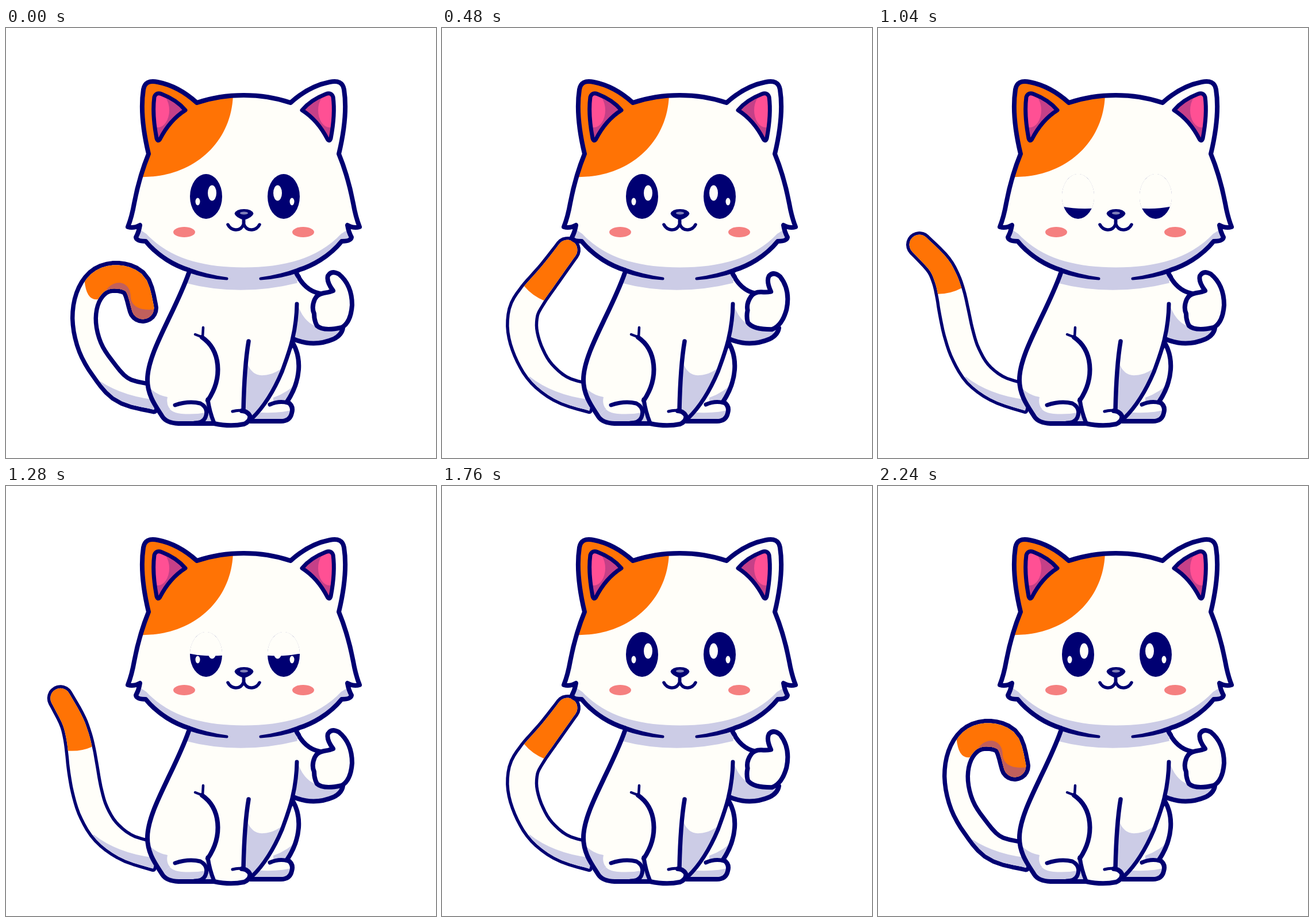
These frames come from a looping animation (748x748 px, 2.32 s). An HTML page:

```html
<!DOCTYPE html>
<html lang="en">
<head>
<meta charset="utf-8">
<title>Cat</title>
<style>
html, body { margin: 0; width: 100%; height: 100%; overflow: hidden; background: #fff; }
svg { display: block; width: 100vw; height: 100vh; }
.line { fill: none; stroke: #000072; stroke-width: 8; stroke-linecap: round; stroke-linejoin: round; }
.ink { fill: #000072; }
.fur { fill: #fffef9; }
.shade { fill: #cccce6; }
.orange { fill: #ff7305; }
</style>
</head>
<body>
<svg viewBox="0 0 748 748">
<defs>
  <path id="half" d="M416 117H413.500Q370 117 332 130Q300 101 264 94Q242 89 239 107Q232 152 248 219Q232 258 223 305Q219 328 212 346Q222 349 233 343Q231 355 226 364Q227 371 243 371C265 398 295 414 318 421Q350 432 385 436H416Z"/>
  <path id="bodyShape" d="M318 426C294 495 246 564 246 612C246 640 262 660 272 676Q279 687 300 688L362 688Q390 694 420 688L428 680C455 655 470 625 499 548L506 479L507 426Z"/>
  <path id="haunch" d="M499 548C514 574 514 612 489 650Q501 657 497 670Q494 684 478 684H425L440 640Z"/>
  <path id="arm" d="M504 424Q518 456 546 462L586 522Q584 534 570 541Q535 556 500 541L480 480Z"/>
  <path id="ear" d="M258 120Q261 111 271 115Q297 125 312 143Q285 160 268 193Q264 199 262 192Q254 150 258 120Z"/>
  <path id="foot" d="M293 656Q318 648 338 653Q353 661 347 677Q343 688 325 686L300 688H280L270 676Z"/>
  <clipPath id="headClip"><use href="#half"/><use href="#half" transform="matrix(-1 0 0 1 827 0)"/></clipPath>
  <clipPath id="bodyClip"><use href="#bodyShape"/></clipPath>
  <clipPath id="haunchClip"><use href="#haunch"/></clipPath>
  <clipPath id="armClip"><use href="#arm"/></clipPath>
  <clipPath id="earClip"><use href="#ear"/></clipPath>
  <clipPath id="footClip"><use href="#foot"/></clipPath>
  <clipPath id="eyeClip"><ellipse cx="348" cy="293" rx="28.300" ry="39.300"/></clipPath>
  <clipPath id="tailClip"><path id="tailMask"/></clipPath>

  <g id="contour">
    <path class="line" d="M413.500 117Q370 117 332 130Q300 101 264 94Q242 89 239 107Q232 152 248 219Q232 258 223 305Q219 328 212 346Q222 349 233 343Q231 355 226 364Q227 371 243 371C265 398 295 414 318 421"/>
    <path class="ink" d="M318 417Q350 429 384 433.500a2.500 2.500 0 0 1 0 5Q350 437 316 425Z"/>
    <use href="#ear" fill="#c54088"/>
    <ellipse cx="264" cy="143" rx="20" ry="30" fill="#ff5094" clip-path="url(#earClip)"/>
    <use href="#ear" class="line" style="stroke-width:7"/>
    <ellipse cx="310" cy="355" rx="19" ry="9" fill="#f58080"/>
    <path class="line" style="stroke-width:5.500" d="M413.500 330V341Q409 352 399 351Q390 350 386 342"/>
  </g>
  <g id="eye">
    <ellipse class="ink" cx="348" cy="293" rx="28" ry="39"/>
    <ellipse class="fur" cx="358.500" cy="287" rx="7.500" ry="13.500"/>
    <ellipse class="fur" cx="333.500" cy="302" rx="4" ry="6.500"/>
    <path id="lid" class="fur" clip-path="url(#eyeClip)"/>
  </g>
</defs>

<g id="tail">
  <path id="tailBody" class="fur" stroke="#000072" stroke-linejoin="round" paint-order="stroke"/>
  <g clip-path="url(#tailClip)">
    <path class="shade" d="M152 606Q195 640 262 647V695H140Z"/>
    <path id="tailTip" class="orange"/>
    <path id="curlShade" fill="#c1605c" d="M166 481Q172 443 198 443Q217 446 217 470Q222 496 268 488V520H166Z"/>
  </g>
</g>

<use href="#haunch" class="fur"/>
<path class="shade" clip-path="url(#haunchClip)" d="M515 608Q495 632 465 643V652L490 649ZM430 668Q475 672 502 663V690H420Z"/>
<use href="#haunch" class="line"/>
<path class="line" style="stroke-width:7" d="M459 655Q475 648 490 652"/>

<use href="#arm" class="fur"/>
<path class="shade" clip-path="url(#armClip)" d="M506 478Q519 516 545 520L592 524V560H490Z"/>
<path class="line" d="M504 424Q518 456 546 462M500 541Q535 556 570 541Q584 534 586 522"/>

<use href="#bodyShape" class="fur"/>
<g class="shade" clip-path="url(#bodyClip)">
  <path d="M300 420L310 443Q413 470 520 440V420Z"/>
  <path d="M419 582Q428 606 448 604Q470 603 490 583V640L430 690L412 662Z"/>
  <path d="M240 614Q256 638 281 642Q277 660 293 669L352 672V695H240Z"/>
  <path d="M347 650L352 645L364 690H344Z"/>
</g>
<use href="#foot" class="fur"/>
<path class="shade" clip-path="url(#footClip)" d="M265 655H281Q284 669 305 671Q330 673 352 668V692H265Z"/>
<g class="line">
  <path d="M504 424Q506 429 509 433"/>
  <path d="M318 426C294 495 246 564 246 612C246 640 262 660 272 676Q279 687 300 688L362 688Q390 694 414 689Q426 684 424 674Q419 666 410 666"/>
  <path d="M506 480C505 535 490 570 480 598Q458 650 428 679" style="stroke-width:7"/>
  <path d="M341 538C373 560 378 608 351 648"/>
  <path d="M351 646Q354 668 362 687" style="stroke-width:7"/>
  <path d="M294 656Q318 648 338 653Q353 661 347 677Q343 687 328 687" style="stroke-width:7"/>
  <path d="M394 667Q404 664 413 666" style="stroke-width:5"/>
  <path d="M422 545C416 580 414 620 413 664" style="stroke-width:7.500"/>
  <path d="M329 533L342 538M343 521L342 538" style="stroke-width:4.500"/>
</g>

<use href="#half" class="fur"/>
<use href="#half" class="fur" transform="matrix(-1 0 0 1 827 0)"/>
<g clip-path="url(#headClip)">
  <path class="orange" d="M395 110C396 200 323 263 230 259V80H395Z"/>
  <path class="shade" d="M226 346Q238 354 244 358C285 402 345 416.500 413.500 416.500S542 402 583 358Q590 354 601 346V445H226Z"/>
</g>
<use href="#contour"/>
<use href="#contour" transform="matrix(-1 0 0 1 827 0)"/>
<path class="ink" d="M397.500 323Q400 315 414 315T430.500 323Q428 330 414 334Q400 330 397.500 323Z"/>
<ellipse cx="414" cy="322" rx="7" ry="2.600" fill="#8080b8"/>
<use href="#eye"/>
<use href="#eye" transform="matrix(-1 0 0 1 831 0)"/>

<path id="fist" class="line" style="fill:#fffef9" d="M569 457Q557 441 560 431Q566 421 579 428Q602 447 602 482Q600 512 584 521Q552 528 541 518Q536 509 536 497Q531 486 537 472Q541 463 553 461Q562 460 569 457Z"/>
</svg>

<script>
const $ = id => document.getElementById(id);
const STEP = 80, LAST = 28;

// Tail spines from base to tip, keyed by step.
const base = [262, 645];
const spines = [
  [0, [204,630, 168,592, 145,552, 136,507, 143,467, 164,440, 195,433, 225,446, 238,487]],
  [6, [211,630, 174,602, 152,567, 140,528, 142,493, 157,466, 174,444, 192,421, 218,386]],
  [10, [211,630, 174,601, 152,566, 142,528, 138,492, 137,462, 137,434, 138,405, 140,368]],
  [13, [211,629, 174,602, 152,566, 140,530, 132,493, 126,463, 118,436, 104,410, 72,377]]
].map(([at, xy]) => ({ at, bones: toBones(xy) }));
const curledWidth = [27, 26, 25, 24, 24, 25, 27, 28, 28, 27];
const looseWidth = [27, 26, 27, 27.5, 28, 28, 27, 25.5, 24, 23];

const mix = (a, b, k) => a + (b - a) * k;

function toBones(xy) {
  let [px, py] = base;
  const bones = [];
  for (let i = 0; i < xy.length; i += 2) {
    const dx = xy[i] - px, dy = xy[i + 1] - py;
    bones.push([Math.hypot(dx, dy), Math.atan2(dy, dx)]);
    px = xy[i]; py = xy[i + 1];
  }
  return bones;
}

function tailPoints(n, loose) {
  let i = 0;
  while (i < spines.length - 2 && n >= spines[i + 1].at) i++;
  const a = spines[i], b = spines[i + 1], k = (n - a.at) / (b.at - a.at);
  let [x, y] = base;
  const radius = j => mix(curledWidth[j], looseWidth[j], loose);
  const points = [[x, y, radius(0)]];
  a.bones.forEach(([len, ang], j) => {
    const l = mix(len, b.bones[j][0], k), t = mix(ang, b.bones[j][1], k);
    x += l * Math.cos(t);
    y += l * Math.sin(t);
    points.push([x, y, radius(j + 1)]);
  });
  return points;
}

// Catmull-Rom sample of the spine at u, as [x, y, radius].
function sample(p, u) {
  const i = Math.min(Math.floor(u), p.length - 2), t = u - i;
  const at = j => p[Math.max(0, Math.min(p.length - 1, j))];
  const [a, b, c, d] = [at(i - 1), at(i), at(i + 1), at(i + 2)];
  return b.map((v, m) => v + t / 2 * (c[m] - a[m] +
    t * (2 * a[m] - 5 * v + 4 * c[m] - d[m] + t * (3 * (v - c[m]) + d[m] - a[m]))));
}

function edge(p, u, side, inset) {
  const [x, y, r] = sample(p, u);
  const q = sample(p, Math.max(0, u - .05)), s = sample(p, Math.min(p.length - 1, u + .05));
  const t = Math.atan2(s[1] - q[1], s[0] - q[0]) + side * Math.PI / 2;
  return [x + (r - inset) * Math.cos(t), y + (r - inset) * Math.sin(t)];
}

// Outline from one side around the tip and back along the other.
function outline(p, from, to, inset) {
  const end = p.length - 1, out = [], N = 40;
  for (let i = 0; i <= N; i++) out.push(edge(p, mix(from, end, i / N), -1, inset));
  for (let i = 1; i < 12; i++) out.push(edge(p, end, i / 6 - 1, inset));
  for (let i = 0; i <= N; i++) out.push(edge(p, mix(end, to, i / N), 1, inset));
  return out.map(c => c.map(v => v.toFixed(1)).join(" "));
}

function drawTail(n) {
  const loose = Math.min(1, n / 6), p = tailPoints(n, loose);
  const stroke = mix(7.5, 5.5, loose);
  const d = "M" + outline(p, 0, 0, stroke).join("L") + "Z";
  $("tailBody").setAttribute("d", d);
  $("tailBody").setAttribute("stroke-width", stroke * 2);
  $("tailMask").setAttribute("d", d);
  const tip = outline(p, mix(5.5, 6.2, loose), mix(5.1, 6.2, loose), stroke - 1);
  const [bx, by] = sample(p, mix(4.75, 6, loose));
  $("tailTip").setAttribute("d", "M" + tip.join("L") + `Q${bx} ${by} ${tip[0]}Z`);
  $("curlShade").setAttribute("opacity", Math.max(0, 1 - n / 4));
}

function draw(n) {
  drawTail(n);
  const wave = Math.max(0, 1 - Math.abs(n - 6) / 6);
  $("fist").setAttribute("transform", `rotate(${12 * wave} 563 473)`);
  const blink = Math.max(0, n - 10) / 4, y = 254 + 75 * blink;
  $("lid").setAttribute("d", blink ? `M315 250H381V${y + 3}Q345 ${y + 6} 315 ${y - 1}Z` : "");
}

let shown = -1;
function tick(now) {
  const f = Math.floor(now / STEP) % (LAST + 1);
  const n = Math.min(f, LAST - f);
  if (n !== shown) draw(shown = n);
  requestAnimationFrame(tick);
}
tick(performance.now());
</script>
</body>
</html>
```
